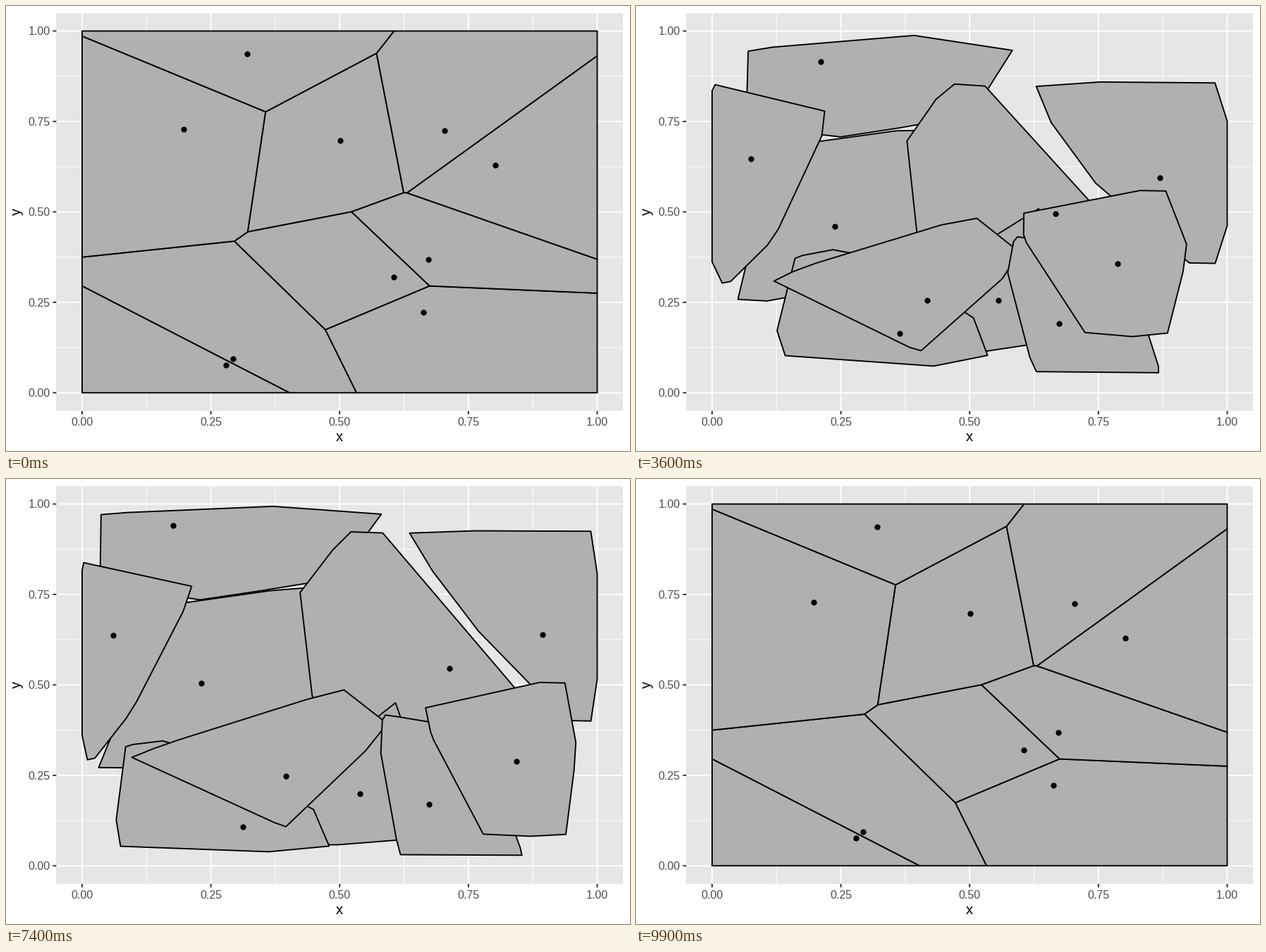
Animation, 885 px wide and 632 px high, one loop 10000 ms. Source, as a matplotlib script:

```python
import numpy as np
import matplotlib.pyplot as plt
from matplotlib.animation import FuncAnimation
from matplotlib.patches import Polygon, Rectangle

W, H, DPI = 885, 632, 64
PT = 72 / DPI                      # points per pixel
N = 50                             # vertices per morphing tile
FRAMES, STEP = 100, 100
LEAVE, ARRIVE, RETURN = 12, 50, 63

# Sites of both layouts, row by row, listed from back tile to front tile
START = np.array([
    (.5011, .6974), (.29275, .0940), (.27985, .0764), (.7043, .7252),
    (.6629, .2227), (.8018, .6302), (.6051, .3194), (.6719, .3688),
    (.3204, .9377), (.1979, .7291)])
END = np.array([
    (.1388, .9695), (.2250, .5523), (.7643, .6000), (.5193, .1374),
    (.9208, .6876), (.2547, .0465), (.3711, .2386), (.6733, .1475),
    (.9042, .2127), (.0445, .6253)])


def to_px(p):
    p = np.asarray(p, float)
    return np.column_stack([107.9 + 730.6 * p[:, 0], 549.3 - 513.8 * p[:, 1]])


def clip(poly, mid, normal):
    """Keep the part of poly on the negative side of a line."""
    out = []
    side = [(p - mid) @ normal for p in poly]
    for i, p in enumerate(poly):
        j = (i + 1) % len(poly)
        if side[i] <= 0:
            out.append(p)
        if side[i] * side[j] < 0:
            out.append(p + (poly[j] - p) * side[i] / (side[i] - side[j]))
    return out


def voronoi(sites):
    cells = []
    for i, s in enumerate(sites):
        cell = [np.array(c, float) for c in ((0, 1), (1, 1), (1, 0), (0, 0))]
        for j, o in enumerate(sites):
            if i != j:
                cell = clip(cell, (s + o) / 2, o - s)
        cells.append(np.array(cell))
    return cells


def densify(poly):
    """Split the longest pieces until the outline has N vertices."""
    nxt = np.roll(poly, -1, axis=0)
    length = np.hypot(*(nxt - poly).T)
    parts = np.ones(len(poly), int)
    while parts.sum() < N:
        parts[np.argmax(length / parts)] += 1
    return np.vstack([a + (b - a) * np.arange(k)[:, None] / k
                      for a, b, k in zip(poly, nxt, parts)])


def align(a, b):
    """Rotate the vertex order of b for the least squared travel."""
    turns = [np.roll(b, k, axis=0) for k in range(N)]
    return min(turns, key=lambda t: ((a - t) ** 2).sum())


def ease(t):
    return 4 * t ** 3 if t < .5 else 1 - 4 * (1 - t) ** 3


def progress(f):
    if f <= LEAVE:
        return 0
    if f < ARRIVE:
        return ease((f - LEAVE) / (ARRIVE - LEAVE))
    if f <= RETURN:
        return 1
    return 1 - ease((f - RETURN) / (FRAMES - RETURN))


tiles_a = [densify(c) for c in voronoi(START)]
tiles_b = [align(a, densify(c)) for a, c in zip(tiles_a, voronoi(END))]

plt.rcParams["font.family"] = "Liberation Sans"
fig = plt.figure(figsize=(W / DPI, H / DPI), dpi=DPI, facecolor="white")
ax = fig.add_axes([0, 0, 1, 1])
ax.set_xlim(0, W)
ax.set_ylim(H, 0)
ax.axis("off")

# Panel, grid and axes
L, R, T, B = 71.4, 875, 9.8, 575
ax.add_patch(Rectangle((L, T), R - L, B - T, fc="#e6e6e6", lw=0, zorder=0))


def line(x, y, color, width, z):
    ax.plot(x, y, color=color, lw=width * PT, zorder=z, snap=False,
            solid_capstyle="butt")


def label(x, y, s, size, color, **kw):
    ax.text(x, y, s, fontsize=size * PT, color=color, va="baseline", **kw)


for k in range(8):
    v = k / 8
    if k % 2:
        (x, y), = to_px([(v, v)])
        line([x, x], [T, B], "white", .97, 1)
        line([L, R], [y, y], "white", .97, 1)
for k in range(5):
    v = k / 4
    (x, y), = to_px([(v, v)])
    line([x, x], [T, B], "white", 1.95, 2)
    line([L, R], [y, y], "white", 1.95, 2)
    line([x, x], [B, B + 5], "#333333", 1.95, 2)
    line([L - 5, L], [y, y], "#333333", 1.95, 2)
    label(x, 595.6, f"{v:.2f}", 16, "#4d4d4d", ha="center")
    label(62.8, y + 5.8, f"{v:.2f}", 16, "#4d4d4d", ha="right")
label(473.2, 617.8, "x", 20, "black", ha="center")
label(21.3, 292.4, "y", 20, "black", ha="center", rotation=90,
      rotation_mode="anchor")

tiles = [ax.add_patch(Polygon(to_px(t), closed=True, fc="#b0b0b0", ec="black",
                              lw=1.9 * PT, joinstyle="round", snap=False,
                              zorder=3 + i / 100))
         for i, t in enumerate(tiles_a)]
dots, = ax.plot([], [], "o", color="black", ms=8.3 * PT, mew=0, zorder=5,
                snap=False)


def update(f):
    s = progress(f)
    for tile, a, b in zip(tiles, tiles_a, tiles_b):
        tile.set_xy(to_px(a + (b - a) * s))
    dots.set_data(*to_px(START + (END - START) * s).T)
    return [*tiles, dots]


anim = FuncAnimation(fig, update, frames=FRAMES, interval=STEP, repeat=True,
                     repeat_delay=0, blit=False)
plt.show()
```
